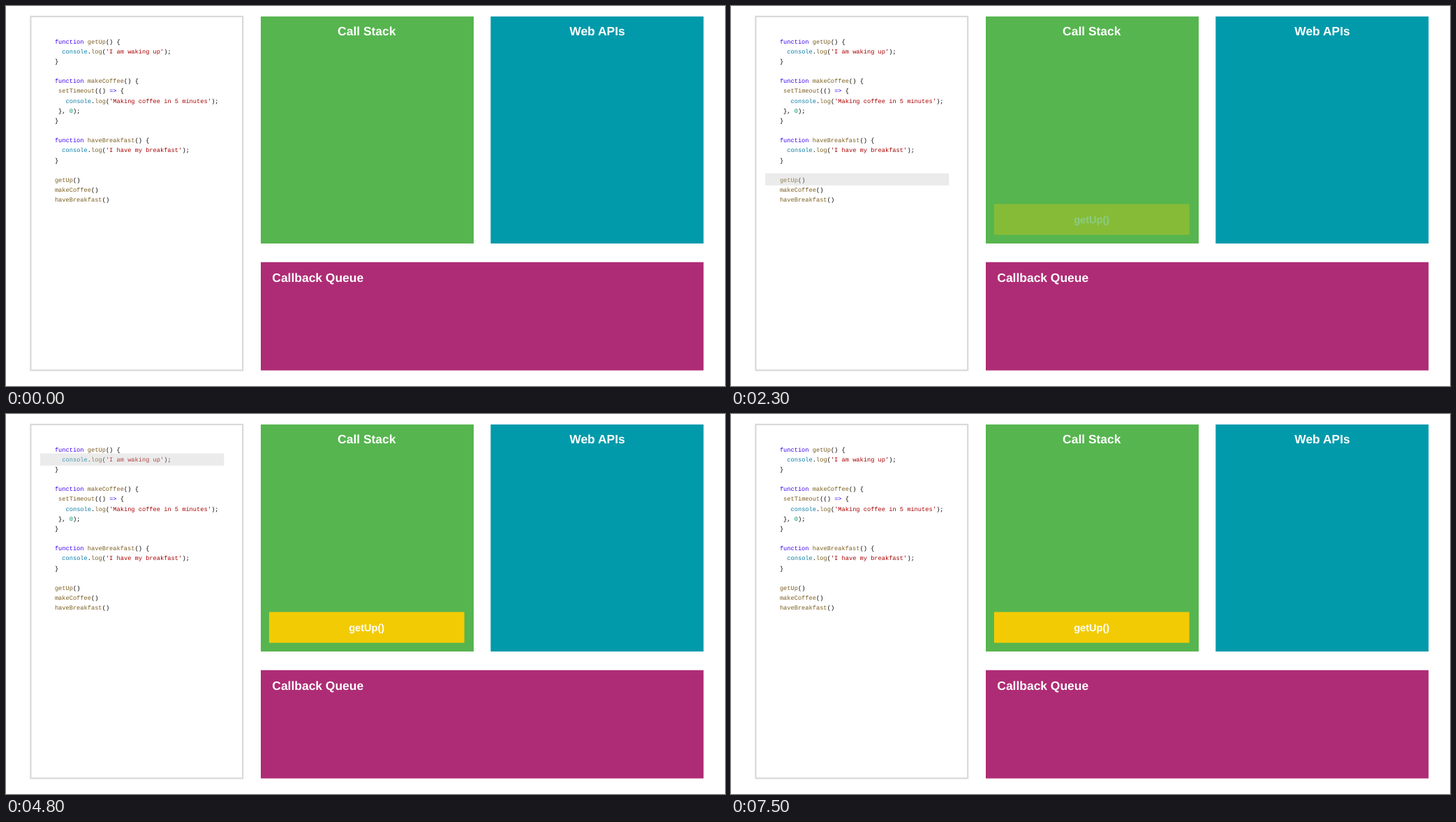
An HTML page that plays this animation: 1030x544 px, repeating every 8 s.

```html
<!DOCTYPE html>
<html lang="en">
<head>
<meta charset="utf-8">
<title>Call stack</title>
<style>
  html, body { margin: 0; width: 100%; height: 100%; overflow: hidden; background: #fff; }
  svg { display: block; width: 1030px; height: 544px; }
  text { text-rendering: geometricPrecision; white-space: pre; }
  .code { font: 8.69px "Liberation Mono", monospace; fill: #000; }
  .title { font: bold 17.45px "Liberation Sans", sans-serif; fill: #fff; }
  .call { font: bold 14.6px "Liberation Sans", sans-serif; fill: #fff; text-anchor: middle; }
  .mid { text-anchor: middle; }
  .k { fill: #3c00ee; }
  .f { fill: #7b5e20; }
  .o { fill: #087ca7; }
  .s { fill: #a80000; }
  .n { fill: #00965a; }
  .mark { fill: #c4c4c4; fill-opacity: .34; }
  .frame { fill: #f2cb05; }
</style>
</head>
<body>
<svg viewBox="0 0 1030 544">
  <rect x="35.4" y="15" width="303.8" height="506.5" fill="#fff" stroke="#d9d9d9" stroke-width="2.2"/>
  <rect x="365" y="15" width="305" height="325" fill="#56b54f"/>
  <rect x="694.3" y="15" width="305" height="325" fill="#009aab"/>
  <rect x="365" y="366.7" width="634.3" height="155" fill="#ae2c75"/>
  <text class="title mid" x="516.8" y="42.4">Call Stack</text>
  <text class="title mid" x="847" y="42.4">Web APIs</text>
  <text class="title" x="381.3" y="395.4">Callback Queue</text>
  <g id="code"></g>
  <rect id="markCall" class="mark" x="49" y="239.5" width="263.3" height="17.4"/>
  <rect id="markLog" class="mark" x="49" y="56.4" width="263.3" height="17.4"/>
  <g id="boxCall">
    <rect class="frame" x="376.9" y="283.4" width="279.7" height="44.2"/>
    <text class="call" x="516.7" y="310.8">getUp()</text>
  </g>
  <g id="boxLog">
    <rect class="frame" x="376.9" y="228.9" width="279.7" height="44.2"/>
    <text class="call" x="516.7" y="256.3">console.log('I am waking up')</text>
  </g>
</svg>
<script>
const NS = 'http://www.w3.org/2000/svg';
const LOOP = 8000;
const CHAR = 5.215, LINE = 14.16, LEFT = 69.9, BASE = 53.6;

const source = `function getUp() {
  console.log('I am waking up');
}

function makeCoffee() {
 setTimeout(() => {
   console.log('Making coffee in 5 minutes');
 }, 0);
}

function haveBreakfast() {
  console.log('I have my breakfast');
}

getUp()
makeCoffee()
haveBreakfast()`;

const token = /(?<s>'[^']*')|(?<k>function\b|=>)|(?<o>console)|(?<f>[A-Za-z]+)|(?<n>\d+)|(?<p>[^\sA-Za-z\d'=]+)/g;

function drawCode() {
  const code = document.getElementById('code');
  source.split('\n').forEach((line, row) => {
    for (const m of line.matchAll(token)) {
      const kind = Object.keys(m.groups).find(key => m.groups[key]);
      const text = document.createElementNS(NS, 'text');
      text.setAttribute('class', 'code ' + kind);
      text.setAttribute('x', LEFT + m.index * CHAR);
      text.setAttribute('y', BASE + row * LINE);
      text.textContent = m[0];
      code.append(text);
    }
  });
}

// Stepped fades: [start in ms, opacity]
const fades = {
  markCall: [[1200, .5], [1300, 1], [3600, .1], [3900, 0]],
  boxCall: [[2200, .1], [2300, .31], [2400, .5], [2500, .7], [3600, 1]],
  markLog: [[4300, .5], [4800, 1], [7100, .5], [7500, 0]],
  boxLog: [[5100, .5], [5600, 1], [6300, .5], [6700, 0]]
};

function levelAt(steps, t) {
  let level = 0;
  for (const [start, value] of steps) if (t >= start) level = value;
  return level;
}

const origin = performance.now();

function render() {
  const t = (performance.now() - origin) % LOOP;
  for (const id in fades) {
    document.getElementById(id).setAttribute('opacity', levelAt(fades[id], t));
  }
  requestAnimationFrame(render);
}

drawCode();
render();
</script>
</body>
</html>
```
